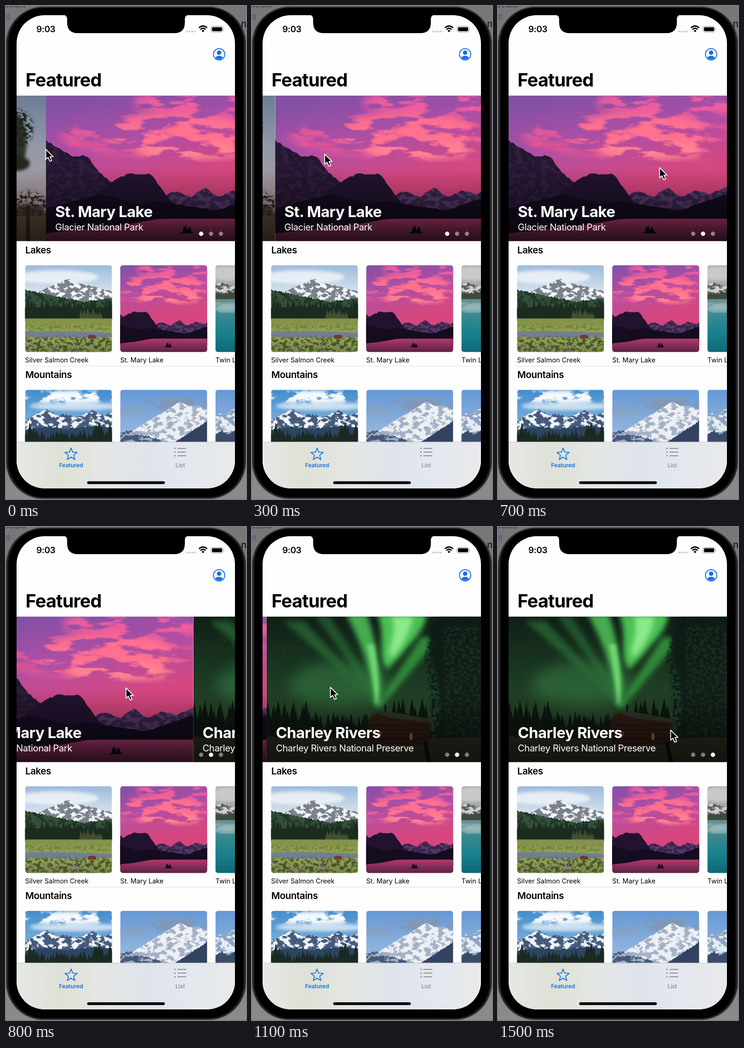
These frames come from a looping animation (522x1072 px, 1.6 s). An HTML page:

```html
<!DOCTYPE html>
<html lang="en">
<head>
<meta charset="utf-8">
<title>Featured landmarks</title>
<style>
html, body { margin: 0; width: 100%; height: 100%; overflow: hidden; background: #777; }
svg { display: block; }
text { font-family: Inter, "Liberation Sans", sans-serif; letter-spacing: -.02em; }
.large { font-size: 39.5px; font-weight: 700; }
.title { font-size: 33.2px; font-weight: 700; fill: #fff; }
.sub { font-size: 20.2px; fill: #fff; }
.head { font-size: 20.5px; font-weight: 600; }
.cap { font-size: 14.5px; letter-spacing: 0; }
.tab { font-size: 12.2px; font-weight: 600; letter-spacing: 0; text-anchor: middle; }
</style>
</head>
<body>
<svg id="stage" width="522" height="1072" viewBox="0 0 522 1072"></svg>
<script>
const W = 475, H = 317, CARD = 189, BLUE = '#176fe0', GREY = '#85878a';

let seed = 7;
const rnd = () => (seed = (seed * 1664525 + 1013904223) >>> 0) / 4294967296;
const n1 = v => v.toFixed(1);

const path = (d, fill, more = '') => `<path d="${d}" fill="${fill}" ${more}/>`;
const rect = (x, y, w, h, fill, more = '') =>
  `<rect x="${x}" y="${y}" width="${w}" height="${h}" fill="${fill}" ${more}/>`;
const circle = (x, y, r, fill, more = '') => `<circle cx="${x}" cy="${y}" r="${r}" fill="${fill}" ${more}/>`;
const oval = (x, y, rx, ry, fill, more = '') =>
  `<ellipse cx="${x}" cy="${y}" rx="${rx}" ry="${ry}" fill="${fill}" ${more}/>`;
const text = (x, y, cls, str, more = '') => `<text x="${x}" y="${y}" class="${cls}" ${more}>${str}</text>`;
const at = (x, y, body, more = '') => `<g transform="translate(${x} ${y})" ${more}>${body}</g>`;
const use = (filter, opacity = 1) => `filter="url(#${filter})" opacity="${opacity}"`;

// evenly spaced colour stops
const grad = (id, colors, dir = 'x2="0" y2="1"') =>
  `<linearGradient id="${id}" ${dir}>` +
  colors.map((c, i) => `<stop offset="${i / (colors.length - 1)}" stop-color="${c}"/>`).join('') +
  '</linearGradient>';

// keeps only the noisy part of a shape, with an optional soft edge
const noise = (id, freq, gain, cut, soft = 0) =>
  `<filter id="${id}" x="-10%" y="-20%" width="120%" height="140%">` +
  `<feTurbulence type="fractalNoise" baseFrequency="${freq}" numOctaves="4" seed="4"/>` +
  `<feColorMatrix values="0 0 0 0 0 0 0 0 0 0 0 0 0 0 0 0 0 0 ${gain} ${-cut * gain}" result="n"/>` +
  `<feGaussianBlur in="SourceGraphic" stdDeviation="${soft}"/>` +
  '<feComposite in2="n" operator="in"/></filter>';

// skyline: the highest of several summits [x, y, slope, flat half-width]
const ridge = (base, peaks, rough = 2, width = W) => {
  let d = `M0 ${base}`;
  for (let x = 0; x <= width; x += width / 90) {
    const tops = peaks.map(([px, py, slope, flat = 0]) => py + Math.max(0, Math.abs(x - px) - flat) * slope);
    d += `L${n1(x)} ${n1(Math.min(base, ...tops) + (rnd() - .5) * 2 * rough)}`;
  }
  return d + `L${width} ${base}Z`;
};
const hills = (base, peaks, rough) => ridge(base, peaks, rough, CARD);

const forest = (x0, x1, base, h, n) => {
  let d = '';
  for (let i = 0; i < n; i++) {
    const x = x0 + (x1 - x0) * (i + rnd()) / n, t = h * (.5 + rnd() * .6), w = t * .17 + 1;
    d += `M${n1(x - w)} ${base}L${n1(x - w / 2)} ${n1(base - t / 2)}L${n1(x)} ${n1(base - t)}` +
      `L${n1(x + w / 2)} ${n1(base - t / 2)}L${n1(x + w)} ${base}Z`;
  }
  return d;
};

const specks = (n, x, y, w, h, r) => {
  let d = '';
  for (let i = 0; i < n; i++)
    d += `M${n1(x + rnd() * w)} ${n1(y + rnd() * h)}h${r}v${r}h${-r}Z`;
  return d;
};

// rock face with a second tone scattered over it
const rock = (d, fill, tone, amount = 1) => path(d, fill) + path(d, tone, use('crag', amount));

const sunset = () => {
  const range = ridge(275, [[345, 199, .75], [282, 207, .5], [410, 206, .4], [475, 199, .4]], 2);
  const left = ridge(290, [[0, 98, .62], [74, 131, 1.25, 14]], 2.5);
  const mesa = ridge(290, [[200, 171, 1.35, 28], [165, 174, .7]], 1.5);
  return rect(0, 0, W, H, 'url(#dusk)') +
    oval(360, 15, 170, 32, '#f85f9f', use('wisp', .9)) +
    oval(260, 85, 230, 48, '#f05a9a', use('wisp', .8)) +
    oval(290, 85, 155, 45, '#ff718f', use('wisp')) +
    oval(320, 120, 120, 18, '#ff8590', use('wisp')) +
    oval(90, 107, 45, 7, '#ee5590', use('soft', .7)) +
    rock(range, '#38244d', '#6b4c78', .6) +
    rock(left, '#241631', '#3a2546', .5) +
    path(mesa, '#21132f') +
    path(ridge(290, [[120, 215, .25], [470, 216, .35], [240, 230, .15]], 1), '#150c20') +
    path(`M0 276L270 268H${W}V${H}H0Z`, 'url(#dusklake)') +
    path('M0 260H290L180 280L0 300Z', '#150c20') +
    path('M291 299q15-7 30-2l-3 3h-24Z' + forest(298, 316, 298, 16, 6), '#100a18');
};

const aurora = () => {
  // a ray fans out from the chimney to (x, y)
  const ray = (x, y, w, color, a, bend = 12) =>
    path(`M236 195Q${(x + 236) / 2 + bend} ${y + 95} ${x} ${y}H${x + w}Q${(x + w + 236) / 2 + bend} ${y + 95} 250 195Z`, color, use('glow', a));
  return rect(0, 0, W, H, 'url(#night)') +
    oval(160, 150, 110, 50, '#2f6b3a', use('haze12', .75)) +
    ray(35, 10, 45, '#2c6d39', .7) + ray(105, 0, 32, '#2f7a3d', .55) +
    ray(172, -5, 46, '#48b452', .95, 22) +
    ray(335, 45, 42, '#36963e', .85, -10) +
    path('M240 -5H348C342 38 306 62 294 82L262 115C238 85 262 40 240 -5Z', '#48c052', use('glow')) +
    path('M272 0H318C312 35 298 62 272 90C256 70 288 40 272 0Z', '#9af096', use('glow', .85)) +
    path('M218 60Q232 130 236 190H242Q246 130 234 60Z', '#86e884', use('soft', .65)) +
    path(specks(30, 0, 0, 340, 140, 1.1), '#b8d8bb', 'opacity=".5"') +
    path(forest(-5, 110, 275, 85, 34) + forest(85, 245, 265, 55, 44) + forest(275, 350, 265, 82, 26), '#0e1810') +
    path(`M378 0H${W}V285H360Q395 190 358 95Q342 45 378 0Z`, '#0f1a12', use('soft', .92)) +
    path(`M360 0H${W}V275H350Q365 190 345 95Z`, '#111c13', use('leaf')) +
    path(`M385 20H${W}V260H385Z`, '#343d2a', use('leaf', .4)) +
    path(ridge(H, [[0, 262, .03], [W, 262, .03]], 1.5), '#2b2f20') +
    path('M220 228L240 207L270 220L354 231V280H226Z', '#2f1b13') +
    path('M212 228L238 205L268 207L362 224L356 231L272 221L240 211Z', '#33332a') +
    path('M224 236H350M224 246H350M224 256H350M225 266H350', 'none', 'stroke="#1e120d" stroke-width="2"') +
    rect(311, 254, 6, 14, '#a8604a') + rect(245, 250, 6, 10, '#6f3324') + rect(256, 192, 4, 16, '#171912') +
    path(`M340 272L348 273L358 ${H}H348Z`, '#0d100b');
};

const desert = () =>
  rect(0, 0, W, H, 'url(#dust)') +
  oval(413, 72, 34, 42, '#20251f', use('leaf')) + oval(408, 100, 25, 60, '#20251f', use('soft', .9)) +
  oval(412, 148, 28, 16, '#20251f', use('soft')) +
  oval(440, 245, 42, 38, '#382f27', use('leaf')) + oval(436, 262, 40, 26, '#382f27', use('soft', .8)) +
  rect(395, 262, 80, 55, '#5d4c3b') + rect(432, 240, 8, 77, '#2c2823');

const creek = () => {
  const summit = hills(110, [[92, 30, .45], [112, 40, .28, 14], [165, 54, .4]], 1.5);
  return rect(0, 0, CARD, CARD, 'url(#pale)') +
    oval(70, 26, 90, 15, '#f3f6f9', use('soft', .8)) +
    rock(summit, '#7a818b', '#fbfcfd') + rock(summit, 'none', '#f1f4f7', .8) +
    rock(hills(122, [[0, 54, .2], [189, 72, .12]], 2), '#345039', '#22392a') +
    path(forest(-4, 192, 118, 40, 80), '#1b2c1f') + rect(0, 92, CARD, 25, '#1b2c1f') +
    path(forest(120, 168, 118, 26, 12), '#435030') +
    rect(0, 116, CARD, 73, 'url(#meadow)') + rect(0, 128, CARD, 15, '#5f7634', use('leaf', .6)) +
    path('M0 144Q80 142 189 147V156Q90 160 0 155Z', '#727f93') +
    rect(0, 157, CARD, 32, '#42562c', use('leaf')) +
    path(specks(70, 0, 164, 165, 24, 2.4), '#7f6590') +
    path('M137 160V154Q140 150 146 152Q153 150 155 157V160Z', '#713b2d');
};

const twin = () =>
  rect(0, 0, CARD, CARD, '#a8a9aa') + oval(25, 18, 40, 16, '#c8c9c9', use('soft')) +
  rock(hills(78, [[12, 38, .3], [50, 43, .4]], 2), '#5d6163', '#d0d0d0') +
  path(hills(80, [[0, 60, .1], [50, 58, .1]], 2), '#3e4a3f') +
  rect(0, 74, CARD, 115, 'url(#teal)') + oval(24, 92, 40, 8, '#bfd0d1', use('wisp'));

const range = () =>
  rect(0, 0, CARD, CARD, 'url(#sky)') +
  oval(95, 16, 110, 15, '#f6f9fc', use('puff')) + oval(110, 36, 100, 9, '#e3edf6', use('soft', .8)) +
  rock(hills(130, [[45, 43, .5], [84, 52, .3], [146, 46, .4], [186, 50, .4]], 2.5), '#455b7b', '#f1f5fa') +
  path(hills(130, [[50, 80, .15], [150, 78, .12]], 2), '#2c4560') +
  path(forest(-4, 192, 120, 32, 60) + forest(-3, 26, 120, 46, 12) + forest(148, 190, 120, 48, 14), '#1b2922');

const peak = () =>
  rect(0, 0, CARD, CARD, 'url(#sky2)') +
  oval(125, 30, 75, 14, '#8297b2', use('puff', .9)) + oval(25, 45, 35, 8, '#8c9fb7', use('soft', .6)) +
  rock(hills(150, [[132, 27, .62, 4], [162, 35, .55, 8]], 1.5), '#eceff4', '#93a2ba', .8) +
  rock(hills(150, [[18, 88, .3], [50, 98, .35]], 2.5), '#45587c', '#dbe4ee', .6) +
  path(hills(150, [[189, 68, .65]], 2), '#344261');

const crag = () =>
  rect(0, 0, CARD, CARD, 'url(#sky2)') +
  rock(hills(130, [[10, 52, .6], [42, 40, .7]], 2), '#e5ebf3', '#7791b2', .8) +
  path(hills(140, [[14, 88, .7], [60, 76, .7]], 2), '#3b4c69');

const soft = (id, s) => `<filter id="${id}" x="-20%" y="-40%" width="140%" height="180%"><feGaussianBlur stdDeviation="${s}"/></filter>`;
const clip = (id, shape) => `<clipPath id="${id}">${shape}</clipPath>`;

const defs =
  soft('soft', 3) + soft('glow', 6) + soft('haze12', 14) +
  noise('wisp', '.012 .04', 8, .46, 9) + noise('puff', '.025 .05', 8, .4, 4) +
  noise('crag', '.07 .1', 12, .49) + noise('leaf', '.12 .16', 10, .47, 3) +
  grad('dusk', ['#8450a6', '#b04fa4', '#d5477f', '#d8437a'], 'x1=".35" y1="0" x2=".6" y2=".9"') +
  grad('dusklake', ['#b03a6c', '#5c2145']) +
  grad('night', ['#101f16', '#193521', '#26472a', '#161f15']) +
  grad('dust', ['#6c7c95', '#8f98a8', '#ab9da3', '#8e7b70']) +
  grad('pale', ['#9dbbdb', '#dae5ee', '#dae5ee', '#dae5ee']) +
  grad('meadow', ['#7f9048', '#9ba656', '#7d8b45']) +
  grad('teal', ['#6d9193', '#37888f', '#17808c', '#0f6875']) +
  grad('sky', ['#438dcc', '#8bbae0', '#8bbae0']) +
  grad('sky2', ['#6598d6', '#94b6dd', '#94b6dd']) +
  grad('shade', ['#0000', '#0009']) +
  grad('bar', ['#e6e8e5', '#dee1d6', '#e4e7e4', '#dfe4ec', '#e4e8ee', '#e8e9ea'], 'x2="1"') +
  grad('back', ['#777', '#8a8a8a']) +
  clip('screen', rect(23, 20, W, 1029, '#000', 'rx="61"')) +
  clip('hero', rect(23, 194.5, W, H, '#000')) +
  clip('page', rect(0, 0, W, H, '#000')) +
  clip('card', rect(0, 0, CARD, CARD, '#000', 'rx="6"')) +
  clip('face', circle(463.5, 105, 10.8, '#000')) +
  `<g id="sunset">${sunset()}</g>`;

const page = (i, art, title, sub) => at(i * W, 194.5,
  art + rect(0, H / 2, W, H / 2, 'url(#shade)') +
  text(20, 264.5, 'title', title) + text(20, 293, 'sub', sub), 'clip-path="url(#page)"');

const row = (y, name, cards) =>
  text(42, y, 'head', name) +
  cards.map(([art, label = ''], i) => at(41.5 + i * 207, y + 25.5,
    `<g clip-path="url(#card)">${art}</g>` + text(0, 211, 'cap', label))).join('');

const star = Array.from({ length: 10 }, (_, i) => {
  const a = Math.PI * (i / 5 - .5), r = i % 2 ? 6 : 14;
  return `${n1(141.5 + r * Math.cos(a))},${n1(975 + r * Math.sin(a))}`;
}).join(' ');

const shell =
  rect(0, 0, 522, 1072, 'url(#back)') +
  text(-12, 3, 'cap', 'nDetails', 'fill="#333"') + text(-5, 29, 'cap', '0)', 'fill="#2d4a9a"') +
  text(511, 46, 'head', 'n', 'fill="#222"') +
  rect(1, 2, 520, 1069, '#1c1c1c', 'rx="80" stroke="#3d3d3d" stroke-width="2"') +
  rect(5.5, 4, 511, 1064, '#000', 'rx="77"');

const status =
  text(66, 57, 'head', '9:03', 'style="font-size:19px"') +
  [0, 1, 2, 3].map(i => circle(394 + i * 5.5, 55.5, 1.9, '#c4c4c6')).join('') +
  path('M419.5 47.5Q428.5 39.5 437.5 47.5M422.8 51Q428.5 46 434.2 51', 'none', 'stroke="#000" stroke-width="2.7"') +
  path('M425.3 53.6Q428.5 51 431.7 53.6L428.5 57Z', '#000') +
  rect(446, 44.3, 26, 12.4, 'none', 'rx="3.8" stroke="#999" stroke-width="1.2"') +
  rect(448, 46.3, 22, 8.4, '#000', 'rx="2"') + path('M473.8 48.5q2 2 0 4Z', '#999');

const profile =
  circle(463.5, 105, 12.3, 'none', `stroke="${BLUE}" stroke-width="2"`) +
  `<g clip-path="url(#face)">${circle(463.5, 101.5, 4.8, BLUE)}${oval(463.5, 115.5, 9.3, 7.2, BLUE)}</g>`;

const tabs =
  rect(23, 948, W, 101, 'url(#bar)') + rect(23, 947.5, W, 1, '#c4c7c7') +
  `<polygon points="${star}" fill="none" stroke="${BLUE}" stroke-width="1.8" stroke-linejoin="round"/>` +
  text(141.5, 1003, 'tab', 'Featured', `fill="${BLUE}"`) +
  [962, 970, 978].map(y => circle(367.5, y, 1.6, GREY) + rect(373, y - .9, 19, 1.8, GREY)).join('') +
  text(379, 1003, 'tab', 'List', `fill="${GREY}" style="font-weight:500"`) +
  rect(176.5, 1033.5, 169, 6, '#000', 'rx="3"');

const stage = document.getElementById('stage');
stage.innerHTML =
  `<defs>${defs}</defs>` + shell +
  '<g clip-path="url(#screen)">' + rect(23, 20, W, 1029, '#fefefe') +
  status + profile + text(42.5, 175, 'large', 'Featured') +
  '<g clip-path="url(#hero)"><g id="strip">' +
  page(-1, desert(), '', '') +
  page(0, '<use href="#sunset"/>', 'St. Mary Lake', 'Glacier National Park') +
  page(1, aurora(), 'Charley Rivers', 'Charley Rivers National Preserve') +
  '</g></g>' +
  [0, 1, 2].map(i => circle(424.5 + i * 21.5, 495.3, 4.7, '#fff', 'class="dot"')).join('') +
  row(538, 'Lakes', [
    [creek(), 'Silver Salmon Creek'],
    ['<use href="#sunset" transform="translate(-78 0) scale(.596)"/>', 'St. Mary Lake'],
    [twin(), 'Twin Lake']
  ]) +
  rect(41, 782.5, 457, 1, '#dcdcde') +
  row(809, 'Mountains', [[range()], [peak()], [crag()]]) +
  tabs + '</g>' +
  path('M124 19Q133 20 133 28V36Q133 59 156 59H366Q389 59 389 36V28Q389 20 398 19Z', '#000') +
  `<g id="pointer">${path('M0 0V22L5 17.6L9 26.4L13 24.7L9.3 16.2H16Z', '#000', 'stroke="#fff" stroke-width="1.8" stroke-linejoin="round"')}</g>`;

const strip = document.getElementById('strip');
const pointer = document.getElementById('pointer');
const dots = stage.querySelectorAll('.dot');
const move = (el, x, y) => el.setAttribute('transform', `translate(${x} ${y})`);

const glide = (t, from, to) => {
  const k = Math.min(1, Math.max(0, (t - from) / (to - from)));
  return k * k * (3 - 2 * k);
};
// what is left of a swipe after release: a critically damped spring
const spring = age => {
  const u = Math.max(0, age) / 52;
  return (1 + u) * Math.exp(-u);
};

const draw = t => {
  const drag = 181 * glide(t, 700, 900), away = glide(t, 1100, 1500);
  const first = 64 * spring(t - 200);
  const second = Math.min(W - drag, W * spring(t - 793));
  move(strip, n1(23 + first + second - W), 0);
  move(pointer, n1(86.5 + 276 * glide(t, 200, 500) - 11 * glide(t, 600, 700) - drag + 205 * away),
    n1(311.5 + 40 * glide(t, 200, 500) - 3 * glide(t, 700, 900) + 93 * away));
  const current = (first < 3) + (second < 3);
  dots.forEach((dot, i) => dot.setAttribute('opacity', i === current ? 1 : .45));
};

let shown = -1;
const tick = () => {
  const t = Math.floor(performance.now() % 1600 / 100) * 100;
  if (t !== shown) draw(shown = t);
  requestAnimationFrame(tick);
};
tick();
</script>
</body>
</html>
```
